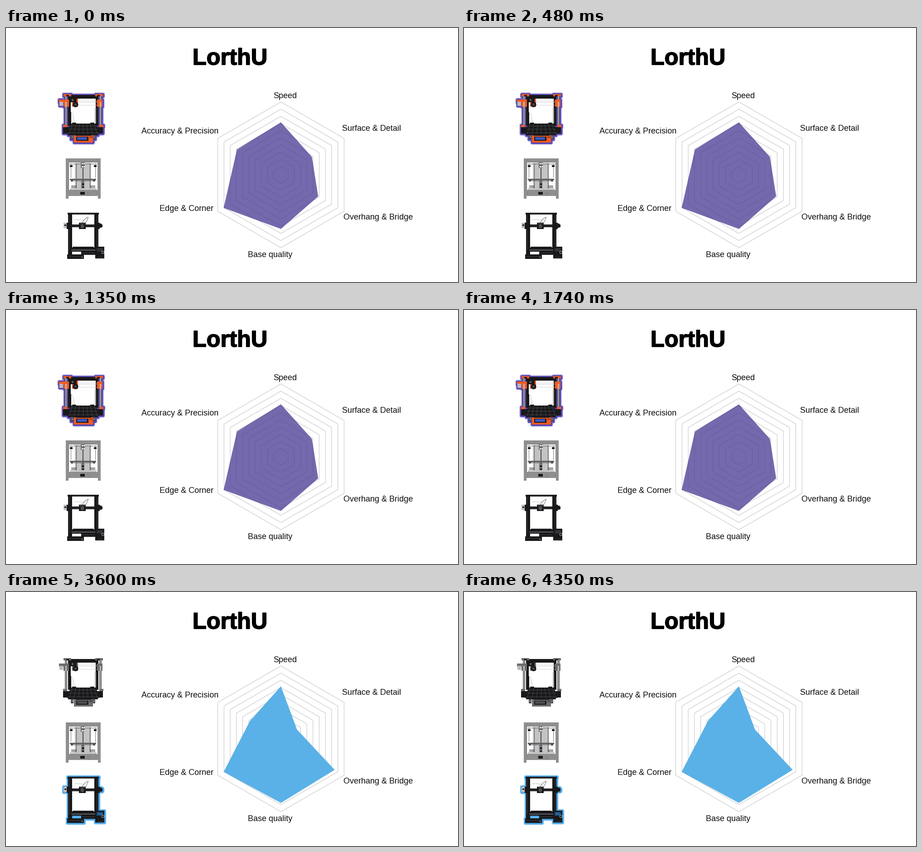
Recreate the animation shown at these times as a matplotlib script. Size 998 by 561 pixels, loop 5400 ms.

```python
import math

import matplotlib.pyplot as plt
from matplotlib import patheffects
from matplotlib.animation import FuncAnimation
from matplotlib.colors import to_rgb
from matplotlib.patches import Circle, Polygon, Rectangle

W, H, DPI = 998, 561, 64
PT = 72 / DPI  # points per pixel
LOOP = 5400
CX, CY, RADIUS, RINGS, GAP = 607, 324.3, 161, 10, 15.85
AXIS = 170.5  # shared centre line of the printers
DARK, EDGE = "#19191b", "#4c4c50"

# axis names clockwise from the top, with the middle of each baseline
LABELS = [
    ("Speed", 616, 155), ("Surface & Detail", 807.5, 227),
    ("Overhang & Bridge", 822, 423), ("Base quality", 583.5, 506),
    ("Edge & Corner", 399, 404), ("Accuracy & Precision", 384.5, 232.5),
]
# fill, ring colour over the fill, distance from the centre on each axis
CHARTS = [
    ("#7469ad", "#62589a", [116, 79, 95, 119.5, 146, 112]),
    ("#f8e865", "#e2d45c", [137, 90, 135, 150.5, 129, 78]),
    ("#5ab1e7", "#5ab1e7", [116, 41, 137, 141.5, 146, 79]),
]

fig = plt.figure(figsize=(W / DPI, H / DPI), dpi=DPI, facecolor="white")
ax = fig.add_axes([0, 0, 1, 1])


def hexagon(radii):
    return [(CX + r * math.sin(k * math.pi / 3), CY - r * math.cos(k * math.pi / 3))
            for k, r in enumerate(radii)]


def rings(color, clip=None):
    for k in range(RINGS):
        ring = ax.add_patch(Polygon(hexagon([RADIUS - GAP * k] * 6), fc="none",
                                    ec=color, lw=0.8 * PT))
        if clip is not None:
            ring.set_clip_path(clip)


def radar(fill, inner, scores):
    rings("#b4b4b4")
    rings(inner, ax.add_patch(Polygon(hexagon(scores), fc=fill, lw=0)))


# Printer parts: x is measured from the centre line, y from the top of the stage.

def add(shape, color, halo=None):
    """Add a filled part, with a soft halo that lies below all parts."""
    pts = shape.get_path().transformed(shape.get_patch_transform()).vertices
    if halo:
        for k, white in enumerate((0.75, 0.4, 0)):
            tint = [c + (1 - c) * white for c in to_rgb(halo)]
            ax.add_patch(Polygon(pts, fc=tint, ec=tint, lw=(9 - 2 * k) * PT,
                                 joinstyle="round", zorder=1 + k / 10))
    shape.set(fc=color, lw=0, zorder=3)
    return ax.add_patch(shape)


def block(x, y, w, h, color, halo=None):
    return add(Rectangle((AXIS + x - w / 2, y - h / 2), w, h), color, halo)


def pair(x, *args):
    block(-x, *args)
    block(x, *args)


def opening(y, w, h):
    block(0, y, w, h, "white").set_zorder(2)


def taper(y0, w0, y1, w1, color):
    add(Polygon([(AXIS - w0 / 2, y0), (AXIS + w0 / 2, y0),
                 (AXIS + w1 / 2, y1), (AXIS - w1 / 2, y1)]), color)


def dot(x, y, r, color, edge="none"):
    ax.add_patch(Circle((AXIS + x, y), r, fc=color, ec=edge, lw=0.8 * PT, zorder=3))


def line(x0, y0, x1, y1, color, width=0.8, sag=0):
    """Draw a line, or a cable that hangs by sag in the middle."""
    ts = [k / 10 for k in range(11)]
    ax.plot([AXIS + x0 + (x1 - x0) * t for t in ts],
            [y0 + (y1 - y0) * t + 4 * sag * t * (1 - t) for t in ts],
            color=color, lw=width * PT, solid_capstyle="butt", zorder=3)


def open_printer(on):
    """Gantry printer with a gridded bed and a control box in front."""
    accent = "#f15a22" if on else "#6c6c6c"
    halo = "#5646b4" if on else None
    opening(183, 55, 57)

    # frame, rods and corners
    block(0, 152, 66, 7.5, DARK, halo)
    pair(38, 183, 5, 66, "#68686c", halo)
    pair(38, 183, 1.6, 66, "#dcdce0")
    pair(30.3, 183, 5.5, 66, DARK, halo)
    pair(35, 148.5, 17, 5, accent, halo)
    pair(34, 149.5, 6, 3, DARK)

    # carriage and print head
    for y in (160.5, 163.5, 170):
        line(-15, y, 32, y, "#cfc8d2")
    block(-46, 161, 15, 7, accent, halo)
    block(-48, 167, 8, 9, "#b9b9bd", halo)
    pair(37, 166, 12, 16, accent, halo)
    pair(38, 168, 3, 11, "#b9b9bd")
    block(-16, 161, 10, 11, accent)
    block(-22, 157, 15, 13, DARK)
    dot(-23.5, 159, 2.2, "#68686c")
    block(-17.5, 169, 13, 10, accent)
    dot(-17, 169, 6, DARK)
    dot(-17, 169, 2.5, EDGE)

    # bracket, cable and drag chain
    block(-28.5, 198, 5, 25, DARK)
    line(-25, 187, -19, 211, "#b5b5b8", sag=-4)
    for y in range(178, 211, 3):
        line(25, y, 29.5, y, "#8b8b8f")

    # base and bed
    pair(36.5, 226, 15, 14, DARK, halo)
    pair(40, 216.7, 9.5, 5.5, accent, halo)
    pair(20, 210.5, 9, 3, DARK)
    taper(211, 56, 234, 72, DARK)
    for k in range(-3, 4):
        line(8 * k, 211, 10.3 * k, 234, EDGE)
    for t in (0.2, 0.5, 0.85):
        half = 28 + 8 * t
        line(-half, 211 + 23 * t, half, 211 + 23 * t, EDGE)
    block(0, 235.5, 66, 3, DARK, halo)
    pair(24, 241, 6, 10, EDGE, halo)
    pair(24, 241, 2.5, 2.5, "#a0a0a4")

    # control box
    block(0.5, 245, 42, 16, accent, halo)
    block(0.5, 236.5, 34, 3, DARK)
    block(-2, 244, 27, 9, DARK)
    block(-2, 244, 22, 6, "#3e57c4" if on else EDGE)
    block(17, 240.5, 7, 4, "#c23c12" if on else EDGE)


def closed_printer(on):
    """Box-shaped printer with a wide front window."""
    body, panel, shade, bed = (
        ("#e5e3e6", "#ebe2ee", "#b4b2b8", "#8fc4d8") if on
        else ("#8f8f8f", "#c3c3c3", "#767676", "#5b5b5b"))
    halo = "#f9e52c" if on else None
    block(0, 329.5, 77, 83, body, halo)
    pair(35.3, 373, 6.5, 8, body, halo)
    block(0, 327.7, 64, 62.5, shade)
    block(0, 327.7, 62.5, 61, "white")
    block(0, 326, 36, 56, panel)
    block(0, 356, 59, 4, panel)

    # rods and carriage
    line(-31, 300, 31, 300, shade, 1.2)
    pair(27, 315, 1, 32, shade)
    pair(15, 326, 1.6, 55, EDGE)
    block(-0.5, 326, 1.8, 52, EDGE)
    block(-0.5, 303, 9, 12, "#6a6a6e")
    for y in (299.5, 306):
        pair(2.2, y, 2.4, 3, "#ededed")
    pair(26.5, 305.2, 6.5, 4.5, DARK)

    # bed and mechanics
    block(0, 334.3, 58, 3.5, bed)
    block(0, 337, 54, 1, EDGE)
    pair(24.5, 337.5, 5, 3, EDGE)
    block(-1, 346, 6.5, 16, "#77777b")
    for y in (345, 351.5):
        block(-0.5, y, 4, 3.5, DARK)
    for y in range(348, 354, 2):
        pair(20.5, y + 0.5, 12, 1, EDGE)

    # front panel
    block(-1.3, 365, 10.5, 6, DARK)
    dot(12, 366, 3.2, body, shade)
    for x in (-31, 31):
        for y in (292, 365):
            dot(x, y, 0.9, shade)


def black_printer(on):
    """Slim black gantry printer with a control box on the right."""
    halo = "#48a5e5" if on else None
    opening(448, 49, 73)

    # posts and beams
    pair(29, 455, 9, 90, DARK, halo)
    for x in (27.5, 31):
        pair(x, 453, 0.7, 78, "#3d3d42")
    block(0, 410.2, 69, 4.5, DARK, halo)
    line(-24, 410, 24, 410, EDGE)
    block(1.5, 436.5, 82, 6, DARK, halo)
    line(-24, 436.5, 24, 436.5, EDGE)

    # feeder, motor, print head and cables
    block(-39, 435.5, 9, 12, "#c0c0c4", halo)
    block(-39, 435, 4, 3, DARK)
    pair(33, 436.5, 6.5, 14, DARK)
    block(38, 436.5, 5, 9, DARK, halo)
    block(-2, 437, 15, 14, DARK)
    dot(-2, 438, 3.2, EDGE, "#77777b")
    line(-8, 432, 4, 432, "#88888c")
    line(-20, 424, 2, 425, "#8dbd8a" if on else "#b0b0b0", sag=-1)
    line(-3, 431, 12, 418, EDGE, sag=-3)
    line(4, 431, 11, 418, EDGE, sag=2)

    # bed, feet and control box
    taper(483, 45, 491, 57, DARK)
    line(-26, 490, 29, 490, "#d0d0d4")
    block(-2, 492.5, 59, 3, DARK, halo)
    block(11, 496.5, 31, 8, DARK, halo)
    line(-2, 496, 25, 496, EDGE)
    block(-17, 505, 37, 10, DARK, halo)
    line(-33, 503.5, -1, 503.5, EDGE)
    dot(-2.5, 506.5, 1.3, "#8c8c90")
    block(37, 496, 20, 26, DARK, halo)
    block(37, 489.7, 14, 8, "#174d7c" if on else "#2b2b2f")
    for y in (487.5, 490.5):
        line(32, y, 42, y, "#4a9ad2" if on else EDGE)
    dot(43.5, 495.5, 2.8, DARK, "#d8d8dc")
    line(32, 505.5, 45, 505.5, EDGE)


PRINTERS = [open_printer, closed_printer, black_printer]


def write(text, x, y, size, **style):
    ax.text(x, y, text, ha="center", va="baseline", family="Liberation Sans",
            fontsize=size * PT, **style)


def draw(i):
    ax.clear()
    ax.set(xlim=(0, W), ylim=(H, 0))
    ax.axis("off")
    heavy = patheffects.withStroke(linewidth=1.8 * PT, foreground="black")
    write("LorthU", 494.5, 81, 50.5, weight="bold", path_effects=[heavy])
    radar(*CHARTS[i])
    for text, x, y in LABELS:
        write(text, x, y, 18, color="#0c0c0c")
    for k, printer in enumerate(PRINTERS):
        printer(k == i)
    return []


anim = FuncAnimation(fig, draw, frames=len(CHARTS), init_func=lambda: [],
                     interval=LOOP // len(CHARTS), repeat=True, repeat_delay=0)
plt.show()
```
